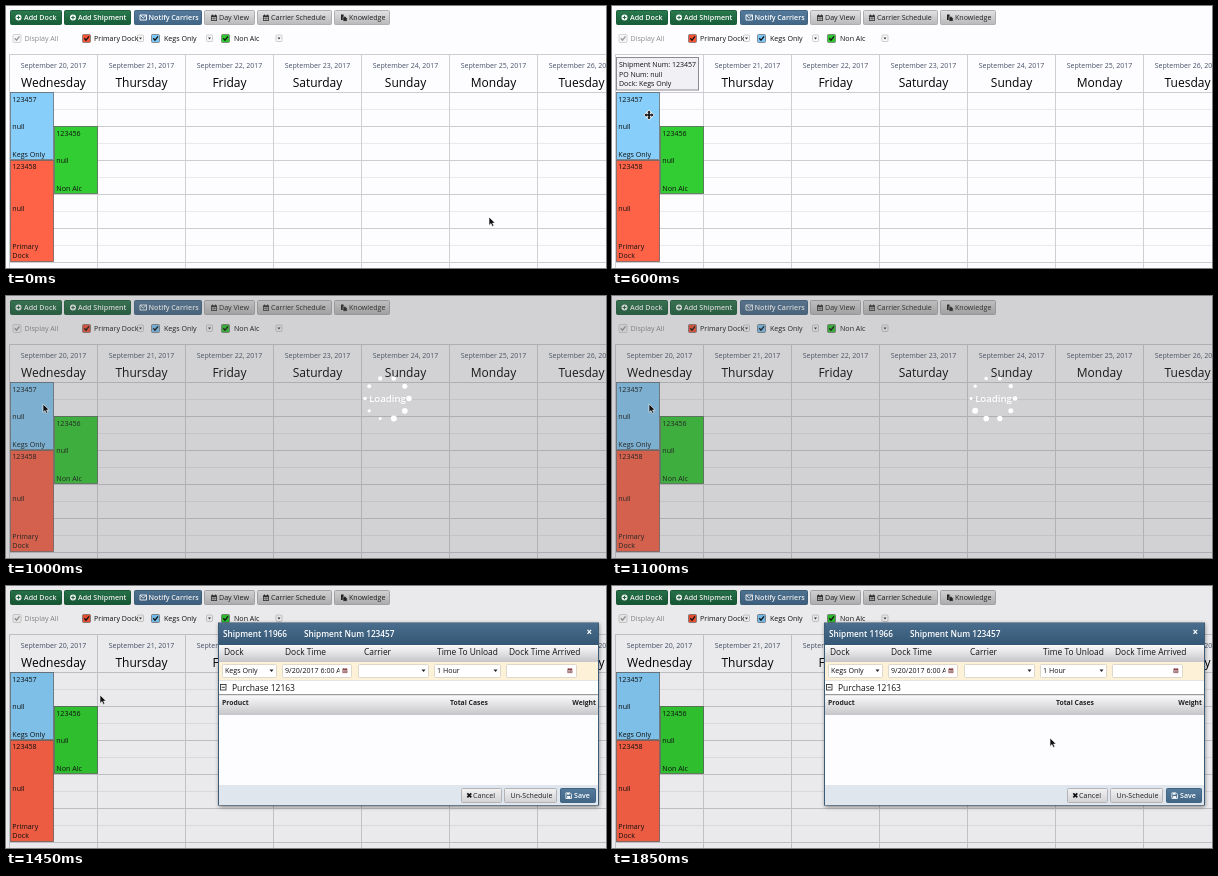
Animation of 600 by 262 pixels, one loop 1900 ms. Source, as an HTML page:

```html
<!DOCTYPE html>
<html lang="en">
<head>
<meta charset="utf-8">
<title>Dock schedule</title>
<style>
html, body { margin: 0; width: 100%; height: 100%; overflow: hidden; background: #fdfcfe; }
svg { display: block; width: 600px; height: 262px; font-family: "Open Sans", "Noto Sans", sans-serif; }
text { white-space: pre; }
</style>
</head>
<body>
<svg id="stage" viewBox="0 0 600 262" xmlns="http://www.w3.org/2000/svg">
  <defs>
    <linearGradient id="green" x2="0" y2="1"><stop stop-color="#2a7a4e"/><stop offset="1" stop-color="#175c37"/></linearGradient>
    <linearGradient id="blue" x2="0" y2="1"><stop stop-color="#557b9c"/><stop offset="1" stop-color="#416585"/></linearGradient>
    <linearGradient id="gray" x2="0" y2="1"><stop stop-color="#e2e2e3"/><stop offset="1" stop-color="#b9b9bb"/></linearGradient>
    <linearGradient id="pale" x2="0" y2="1"><stop stop-color="#f2f2f3"/><stop offset="1" stop-color="#d2d2d5"/></linearGradient>
    <linearGradient id="head" x2="0" y2="1"><stop stop-color="#fbfbfc"/><stop offset="1" stop-color="#c6c6ca"/></linearGradient>
    <linearGradient id="bar" x2="0" y2="1"><stop stop-color="#4a6d8d"/><stop offset="1" stop-color="#345775"/></linearGradient>
    <filter id="shadow" x="-5%" y="-5%" width="110%" height="112%"><feGaussianBlur stdDeviation="2"/></filter>
    <clipPath id="dateClip"><rect x="277" y="78" width="56.5" height="14"/></clipPath>
    <clipPath id="dockClip"><rect x="86" y="26" width="48" height="14"/></clipPath>
  </defs>
  <g id="page"></g>
  <g id="tip"></g>
  <rect id="shade" width="600" height="262"/>
  <g id="loading"></g>
  <g id="dialog"></g>
  <path id="arrow" d="M0 0V8.4L2 6.6 3.3 9.4 4.8 8.7 3.6 6H6.2Z" fill="#111" stroke="#fff" stroke-width=".6"/>
  <path id="move" d="M0-4.6L1.9-2.5H.8V-.8H2.5V-1.9L4.6 0 2.5 1.9V.8H.8V2.5H1.9L0 4.6-1.9 2.5H-.8V.8H-2.5V1.9L-4.6 0-2.5-1.9V-.8H-.8V-2.5H-1.9Z" fill="#111" stroke="#fff" stroke-width="1.2" paint-order="stroke"/>
</svg>
<script>
const $ = id => document.getElementById(id);
const rect = (x, y, w, h, fill, extra = '') =>
  `<rect x="${x}" y="${y}" width="${w}" height="${h}" fill="${fill}" ${extra}/>`;
const text = (s, x, y, size = 7.1, fill = '#111', extra = '') =>
  `<text x="${x}" y="${y}" font-size="${size}" fill="${fill}" ${extra}>${s}</text>`;
const path = (d, stroke, width = 1, fill = 'none') =>
  `<path d="${d}" stroke="${stroke}" stroke-width="${width}" fill="${fill}"/>`;
const down = (x, y) => path(`M${x - 2} ${y - 1}h4l-2 2.4z`, 'none', 0, '#222');
const mid = 'text-anchor="middle"';
const bold = 'font-weight="700"';
const semi = 'font-weight="600"';

const icons = {
  plus: (x, y) => `<circle cx="${x + 3}" cy="${y + 3}" r="3" fill="#fff"/>` +
    path(`M${x + 1.2} ${y + 3}h3.6M${x + 3} ${y + 1.2}v3.6`, '#1f6b41', 1.1),
  mail: (x, y) => path(`M${x} ${y + .5}h6.5v5h-6.5zl3.25 3 3.25-3`, '#fff', .9),
  calendar: (x, y, c = '#333') => rect(x, y + .8, 6, 5.6, c) + rect(x + .8, y + 2.6, 4.4, 3, '#ddd') +
    path(`M${x + 1.5} ${y}v1.6M${x + 4.5} ${y}v1.6`, c, .9) +
    path(`M${x + 2.2} ${y + 2.4}v3.4M${x + 3.8} ${y + 2.4}v3.4M${x} ${y + 4.1}h6`, c, .5),
  book: (x, y) => path(`M${x} ${y}h2.6v2h1.6v3.4h-4.2z`, 'none', 0, '#222') +
    path(`M${x + 2} ${y + 2.2}h2.4l1.8 1.6v3h-4.2z`, '#ddd', .5, '#222'),
  cross: (x, y) => path(`M${x + .8} ${y + .8}l4 4m0-4l-4 4`, '#111', 1.7),
  disk: (x, y) => path(`M${x + .4} ${y + .4}h4.2l1.4 1.4v4.2h-5.6z`, '#fff', .8) +
    rect(x + 1.6, y + .4, 2.4, 1.8, '#fff') + rect(x + 1.6, y + 3.6, 3.2, 2.2, '#fff')
};

function button(x, y, w, h, skin, label, tx, icon, ix) {
  const light = skin === 'gray' || skin === 'pale';
  const edge = { green: '#1b5e3a', blue: '#416482', gray: '#aeaeb0', pale: '#b4b4b8' }[skin];
  return rect(x + .5, y + .5, w - 1, h - 1, `url(#${skin})`, `stroke="${edge}" rx="1"`) +
    (icon ? icons[icon](ix, y + h / 2 - 3) : '') +
    text(label, tx, y + h / 2 + 2.8, 7.1, light ? '#222' : '#fff', light ? '' : semi);
}

function check(x, fill, mark) {
  return rect(x + .5, 28.5, 8, 8, fill, `stroke="${mark === '#111' ? '#777' : '#ccc'}" stroke-width=".8" rx="1"`) +
    path(`M${x + 2.3} 32.3l1.7 1.9 3-3.9`, mark, 1.3);
}

function dropdown(x) {
  return rect(x + .5, 29, 6, 6.5, '#fafafa', 'stroke="#bbb" stroke-width=".7" rx="1"') +
    path(`M${x + 2} 31.5h3l-1.5 1.9z`, 'none', 0, '#333');
}

function shipment(x, y, h, fill, lines) {
  return rect(x + .5, y + .5, 43, h - 1, fill, 'stroke="#444" stroke-opacity=".65" stroke-width=".9"') +
    lines.map(([s, dy]) => text(s, x + 2.3, y + dy)).join('');
}

function drawPage() {
  let out = rect(0, 0, 600, 262, '#fdfcfe');
  out += button(4, 4, 52, 15, 'green', 'Add Dock', 18, 'plus', 9.5) +
    button(58, 4, 67, 15, 'green', 'Add Shipment', 72, 'plus', 64) +
    button(128, 4, 68, 15, 'blue', 'Notify Carriers', 142.5, 'mail', 134) +
    button(198, 4, 51, 15, 'gray', 'Day View', 213, 'calendar', 205) +
    button(251, 4, 75, 15, 'gray', 'Carrier Schedule', 265, 'calendar', 257) +
    button(328, 4, 56, 15, 'gray', 'Knowledge', 343, 'book', 335);
  out += check(6.5, '#f6f6f7', '#999') + text('Display All', 18.5, 34.6, 7.1, '#8c8c8c') +
    check(76, '#f85436', '#111') + dropdown(131) + text('Primary Dock', 88, 34.6, 7.1, '#111', 'clip-path="url(#dockClip)"') +
    check(145, '#7cc8fa', '#111') + text('Kegs Only', 158, 34.6) + dropdown(200) +
    check(215, '#2fc92f', '#111') + text('Non Alc', 228, 34.6) + dropdown(269.5);

  const days = ['Wednesday', 'Thursday', 'Friday', 'Saturday', 'Sunday', 'Monday', 'Tuesday'];
  for (let y = 103.5; y < 262; y += 34) out += path(`M3 ${y}H600`, '#e6e5e9', .8);
  for (let y = 86.5; y < 262; y += 34) out += path(`M3 ${y}H600`, '#cdccd1');
  out += path('M3 48.5H600', '#cdccd1');
  days.forEach((day, i) => {
    const x = 3.5 + i * 88;
    out += path(`M${x} 48V262`, '#d0cfd4') +
      text(`September ${20 + i}, 2017`, x + 44, 62.3, 7, '#47536b', mid) +
      text(day, x + 44, 81.3, 12, '#000', mid);
  });
  return out +
    shipment(4, 86, 68, '#87cefa', [['123457', 9.5], ['null', 36.5], ['Kegs Only', 64.5]]) +
    shipment(48, 120, 68, '#32cd32', [['123456', 9.5], ['null', 36.7], ['Non Alc', 64.5]]) +
    shipment(4, 154, 102, '#ff6347', [['123458', 9.2], ['null', 50.8], ['Primary', 88.5], ['Dock', 98]]);
}

function drawTip() {
  return rect(4.5, 51.5, 82, 32.5, '#f1f0f5', 'stroke="#8c8c90"') +
    ['Shipment Num: 123457', 'PO Num: null', 'Dock: Kegs Only']
      .map((s, i) => text(s, 7, 61 + i * 9.5, 7)).join('');
}

function field(x, w, s = '', picker = false) {
  return rect(x + .5, 78.5, w - 1, 13, '#fff', 'stroke="#d6d0c2" stroke-width=".8" rx="1"') +
    text(s, x + 3, 87.2, 7.1, '#111', picker ? 'clip-path="url(#dateClip)"' : '') +
    (picker
      ? `<g transform="translate(${x + w - 9.5} 82) scale(.8)">${icons.calendar(0, 0, '#8a4448')}</g>`
      : down(x + w - 5.5, 84.5));
}

function drawDialog() {
  let out = rect(213, 38, 380, 183, '#000', 'opacity=".45" filter="url(#shadow)"') +
    rect(212, 36.5, 381, 183, '#3a5a76') +
    rect(213, 37, 379, 22, 'url(#bar)') +
    text('Shipment 11966', 217, 51, 8.25, '#fff', semi) +
    text('Shipment Num 123457', 298, 51, 8.25, '#fff', semi) +
    path('M581.5 43.8l3.6 4m0-4l-3.6 4', '#fff', 1.2);
  out += rect(213, 59, 379, 17, 'url(#head)') + rect(213, 76, 379, 18, '#fdf2d8');
  [['Dock', 218], ['Dock Time', 279], ['Carrier', 358], ['Time To Unload', 431], ['Dock Time Arrived', 503]]
    .forEach(([s, x]) => out += text(s, x, 69.2, 8.4));
  out += field(216, 55, 'Kegs Only') + field(276, 70, '9/20/2017 6:00 AM', true) +
    field(352, 71) + field(428, 67, '1 Hour') + field(500, 71, '', true);
  out += rect(213, 94, 379, 15, '#fff') + path('M213 94.5H592', '#ddd', .8) +
    rect(214.5, 98.5, 5.5, 5.5, '#fff', 'stroke="#333" stroke-width=".9"') +
    path('M215.7 101.25h3.1', '#222', .9) + text('Purchase 12163', 226, 104.6, 8.5);
  out += rect(213, 109, 379, 20, 'url(#head)') + path('M213 108.7H592', '#777', .9) +
    text('Product', 216, 118.7, 6.8, '#222', bold) +
    text('Total Cases', 444, 118.7, 6.8, '#222', bold) +
    text('Weight', 590, 118.7, 6.8, '#222', bold + ' text-anchor="end"');
  out += rect(213, 129, 379, 70, '#fdfcfe') + rect(213, 199, 379, 20, '#e0e6ed') +
    button(455, 202, 41, 15, 'pale', 'Cancel', 467, 'cross', 460.5) +
    button(498, 202, 53, 15, 'pale', 'Un-Schedule', 504.5) +
    button(554, 202, 36, 15, 'blue', 'Save', 568, 'disk', 559.5);
  return out;
}

function drawLoading(t) {
  const n = 10, turn = Math.floor((t - 1000) / 50);
  let out = text('Loading', 381.5, 106, 9.6, '#fff', `${mid} ${semi}`);
  for (let i = 0; i < n; i++) {
    const a = (i / n) * 2 * Math.PI;
    const r = 1.5 + 1.5 * (((n + i - turn + 7) % n) / (n - 1));
    out += `<circle cx="${381 + 22 * Math.cos(a)}" cy="${102.5 + 21 * Math.sin(a)}" r="${r}" fill="#fff"/>`;
  }
  return out;
}

// time, x, y of the pointer tip
const route = [[0, 483, 211], [550, 37, 108], [1250, 37, 108], [1450, 94, 109], [1750, 438, 152], [1900, 438, 152]];
const ease = [p => p * p * (3 - 2 * p), p => p, p => p * p, p => 1 - (1 - p) ** 1.6, p => p];

function pointer(t) {
  const i = route.findIndex((k, j) => j < route.length - 1 && t < route[j + 1][0]);
  const [t0, x0, y0] = route[i], [t1, x1, y1] = route[i + 1];
  const p = ease[i]((t - t0) / (t1 - t0));
  return [x0 + (x1 - x0) * p, y0 + (y1 - y0) * p];
}

const show = (id, on) => $(id).style.display = on ? '' : 'none';

function render(now) {
  const t = Math.floor((now % 1900) / 50) * 50;
  const [x, y] = pointer(t);
  const hover = t < 1000 && x < 48;
  const busy = t >= 1000 && t < 1150;
  const moving = hover && t < 900;
  show('tip', hover);
  show('shade', t >= 1000);
  $('shade').setAttribute('fill', busy ? 'rgba(95,95,95,.27)' : 'rgba(0,0,0,.075)');
  show('loading', busy);
  if (busy) $('loading').innerHTML = drawLoading(t);
  show('dialog', t >= 1150);
  show('arrow', !moving);
  show('move', moving);
  $('arrow').setAttribute('transform', `translate(${x} ${y})`);
  $('move').setAttribute('transform', `translate(${x} ${y + 1})`);
}

$('page').innerHTML = drawPage();
$('tip').innerHTML = drawTip();
$('dialog').innerHTML = drawDialog();

const start = performance.now();
function tick() {
  render(performance.now() - start);
  requestAnimationFrame(tick);
}
tick();
</script>
</body>
</html>
```
